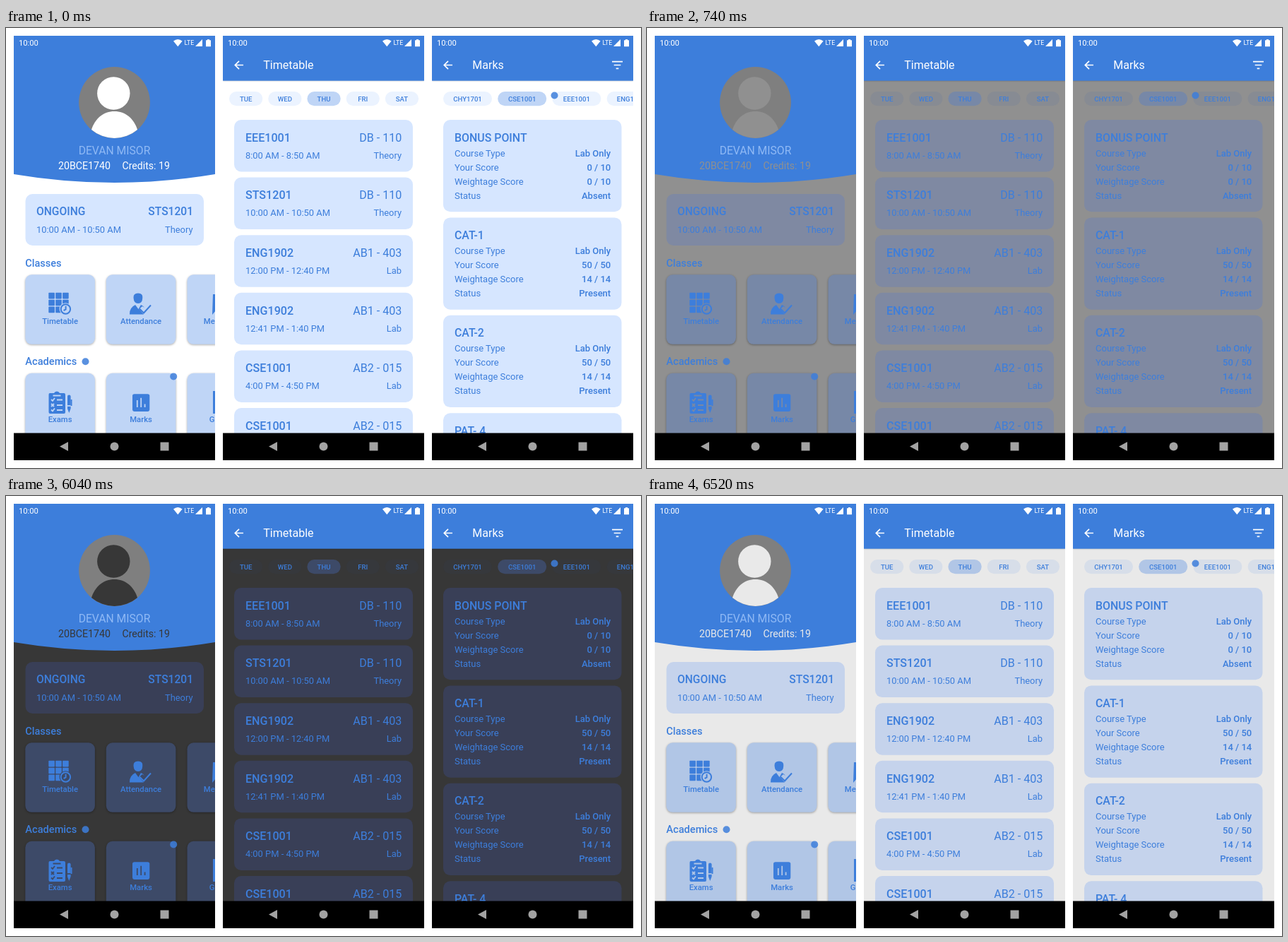
An HTML page that plays this animation: 899x623 px, repeating every 6580 ms.

```html
<!DOCTYPE html>
<html lang="en">
<head>
<meta charset="utf-8">
<title>Student app theme switch</title>
<style>
  html, body { margin: 0; width: 100%; height: 100%; overflow: hidden; background: #fff; }
  #stage { display: block; width: 899px; height: 623px; }
  text { font-family: Roboto, Inter, sans-serif; fill: var(--blue); }
  .m { font-weight: 500; }
  .white { fill: #fff; }
  .name { fill: #8fb9f5; }
  .bg { fill: var(--bg); }
  .card { fill: var(--card); }
  .tile { fill: var(--tile); }
  .pill { fill: var(--pill); }
  .blue { fill: var(--blue); }
  .dot { fill: var(--blue); opacity: .85; }
  .line { fill: none; stroke: #fff; stroke-width: 1.7; }
  .ink { fill: none; stroke: var(--blue); stroke-width: 2; }
  .cut { fill: none; stroke: var(--tile); stroke-width: 1.8; }
  .raised { filter: drop-shadow(0 1.5px 1.5px #0005); }
  .bar { filter: drop-shadow(0 .5px 1px #0004); }
  :root { --blue: #3d7edb; }
</style>
</head>
<body>
<svg id="stage" viewBox="0 0 899 623"></svg>
<script>
const LOOP = 6580, STEP = 60, TO_DARK = 500, TO_LIGHT = 6040;

// light and dark value of each themed colour
const theme = {
  bg: [[255, 255, 255], [33, 33, 33]],
  card: [[214, 230, 255], [40, 44, 68]],
  tile: [[191, 213, 246], [46, 59, 88]],
  pill: [[235, 243, 255], [34, 35, 38]],
};

const rect = (x, y, w, h, cls, r = 0) =>
  `<rect x="${x}" y="${y}" width="${w}" height="${h}" rx="${r}" class="${cls}"/>`;
const circle = (x, y, r, cls) => `<circle cx="${x}" cy="${y}" r="${r}" class="${cls}"/>`;
const path = (d, cls) => `<path d="${d}" class="${cls}"/>`;
// y is the middle of the capitals
const text = (x, y, str, size, cls = '', anchor = 'start') =>
  `<text x="${x}" y="${y + size * .355}" font-size="${size}" class="${cls}" text-anchor="${anchor}">${str}</text>`;
const pair = (x1, x2, y, left, right, size, cls1 = '', cls2 = '') =>
  text(x1, y, left, size, cls1) + text(x2, y, right, size, cls2, 'end');

const statusBar = text(18, 21.5, '10:00', 11.2, 'white')
  + path('M237 18.6Q243.3 13.6 249.6 18.6L243.3 26.2Z', 'white')
  + text(252.5, 21.3, 'LTE', 8.8, 'white')
  + path('M278 16V26H268Z', 'white')
  + path('M283 17.3H285V16H288V17.3H290V26.3H283Z', 'white');

const navBar = rect(11, 573.5, 285, 39, '')
  + `<g fill="#a3a3a3"><path d="M76 592.5L88 586V599Z"/><circle cx="153.5" cy="592.5" r="6"/>
     <path d="M218.5 586.5h12v12h-12z"/></g>`;

function phone(i, body) {
  const x = 11 + 296 * i;
  return `<svg x="${x}" y="11" width="285" height="601" viewBox="${x} 11 285 601">
    ${rect(x, 11, 285, 601, 'bg')}${body}
    <g transform="translate(${296 * i})">${statusBar}${navBar}</g></svg>`;
}

function appBar(x, title) {
  return rect(x, 11, 285, 63.7, 'blue bar')
    + path(`M${x + 29} 52.5h-11.5m5.5-5.7l-5.7 5.7l5.7 5.7`, 'line')
    + text(x + 57.3, 52.2, title, 16, 'white');
}

function pills(x, width, gap, labels, active) {
  return labels.map((label, i) => {
    const left = x + i * gap;
    return rect(left, 90, width, 20.2, i === active ? 'tile' : 'pill', 10.1)
      + text(left + width / 2, 100.2, label, 9.6, 'm', 'middle');
  }).join('');
}

const tile = (x, y, label, icon) => rect(x, y, 98.6, 98.5, 'tile raised', 9) + icon
  + text(x + 49.3, y + 65.2, label, 11.3, 'm', 'middle');

// icons
let timetable = '';
for (let i = 0; i < 9; i++)
  timetable += rect(60.3 + i % 3 * 9.9, 374.8 + Math.floor(i / 3) * 9.9, 8.6, 8.6, 'blue', .8);
timetable += circle(84.4, 398, 8.8, 'tile') + circle(84.4, 398, 6.7, 'ink')
  + path('M84.6 393.8v4.6l-3 1.6', 'ink');

const attendance = path('M180.5 382Q180 375.5 187 375.5T193.3 382Q193 390 187 390T180.5 382Z', 'blue')
  + path('M175 405.5Q174.500 396 183 392L187.500 398L191 392Q194 393 196 396L193 394L188.500 398L195 405.5Z', 'blue')
  + path('M189 397.5L195 403.5L205 392.5', 'ink');

const exams = path('M62 517h6q1-2.500 4-2.500t4 2.500h6q2 0 2 2v25q0 2-2 2H62.500q-2 0-2-2V519q0-2 1.500-2Z', 'blue')
  + path('M66.500 520.500h11M64 526l2 2l3-4M72 526.500h8M64 532l4 4m0-4l-4 4M72 534h8M64 540.500l2 2l3-4M72 541h8', 'cut')
  + path('M87 521.500q0-2 2.300-2t2.300 2V539l-2.300 6L87 539Z', 'blue') + path('M86 535h6', 'cut')
  + path('M92.500 526v9', 'ink');

const marks = rect(179, 518.300, 24.300, 24.600, 'blue', 2.800)
  + path('M185.800 527v10M191.200 523.800v13.200M196.600 532.500v4.500', 'cut');

const home = path('M11 11H296V207Q153.500 231 11 207Z', 'blue')
  + `<circle cx="153.500" cy="105.500" r="50.400" fill="#7f7f7f"/>`
  + circle(152.300, 92.500, 23.200, 'bg')
  + path('M121 144C126 128 138 118 153.500 118S181 128 186 144A50.400 50.400 0 0 1 121 144Z', 'bg')
  + text(153.500, 173.800, 'DEVAN MISOR', 15.700, 'name', 'middle')
  + text(74, 194.600, '20BCE1740', 14.200, 'bg') + text(164.500, 194.600, 'Credits: 19', 14.100, 'bg')
  + rect(27.500, 235, 252.500, 73, 'card', 10)
  + pair(43, 265, 259.700, 'ONGOING', 'STS1201', 15.600, 'm', 'm')
  + pair(43, 264.500, 285, '10:00 AM - 10:50 AM', 'Theory', 12.900)
  + text(27.300, 332.700, 'Classes', 14.500, 'm')
  + tile(27.300, 349.300, 'Timetable', timetable)
  + tile(141.800, 349.300, 'Attendance', attendance)
  + tile(256.500, 349.300, 'Messages', path('M293 377H320V400H297L292 406Z', 'blue'))
  + text(27.300, 472.300, 'Academics', 14.600, 'm') + circle(112.500, 472.200, 5, 'dot')
  + tile(27.300, 488.800, 'Exams', exams)
  + tile(141.800, 488.800, 'Marks', marks) + circle(237.200, 493.400, 5, 'dot')
  + tile(256.500, 488.800, 'Grades', rect(293, 514, 26, 32, 'blue'));

const lessons = [
  ['EEE1001', 'DB - 110', '8:00 AM - 8:50 AM', 'Theory'],
  ['STS1201', 'DB - 110', '10:00 AM - 10:50 AM', 'Theory'],
  ['ENG1902', 'AB1 - 403', '12:00 PM - 12:40 PM', 'Lab'],
  ['ENG1902', 'AB1 - 403', '12:41 PM - 1:40 PM', 'Lab'],
  ['CSE1001', 'AB2 - 015', '4:00 PM - 4:50 PM', 'Lab'],
  ['CSE1001', 'AB2 - 015', '4:51 PM - 5:40 PM', 'Lab'],
];
const week = appBar(307, 'Timetable')
  + pills(316, 47.300, 55.200, ['TUE', 'WED', 'THU', 'FRI', 'SAT'], 2)
  + lessons.map(([code, room, time, kind], i) => {
    const y = 130 + 81.600 * i;
    return rect(323, y, 253, 73.500, 'card', 10)
      + pair(339, 560.300, y + 25, code, room, 16.100, 'm')
      + pair(339, 560, y + 50.300, time, kind, 12.900);
  }).join('');

const tests = [
  ['BONUS POINT', '0 / 10', '0 / 10', 'Absent'],
  ['CAT-1', '50 / 50', '14 / 14', 'Present'],
  ['CAT-2', '50 / 50', '14 / 14', 'Present'],
  ['PAT- 4', '50 / 50', '14 / 14', 'Present'],
];
const scores = appBar(603, 'Marks')
  + path('M858 47.700h15M860.700 52.500h9.600M863.700 57.300h3.600', 'line')
  + pills(619, 69, 77.200, ['CHY1701', 'CSE1001', 'EEE1001', 'ENG1902'], 1)
  + circle(776.500, 95.500, 5, 'dot')
  + tests.map(([title, score, weighted, status], i) => {
    const y = 130 + 138.400 * i;
    const rows = [['Course Type', 'Lab Only'], ['Your Score', score],
      ['Weightage Score', weighted], ['Status', status]];
    return rect(619, y, 252.500, 130.300, 'card', 10)
      + text(635, y + 25, title, 15.900, 'm')
      + rows.map(([a, b], n) => pair(635, 856.200, y + 47 + 20 * n, a, b, 13, '', 'm')).join('');
  }).join('');

document.getElementById('stage').innerHTML = [home, week, scores].map((body, i) => phone(i, body)).join('');

// 0 is light, 1 is dark; the theme fades in steps of a tenth
function darkness(t) {
  if (t < TO_DARK) return 0;
  if (t < TO_LIGHT) return Math.min(10, Math.floor((t - TO_DARK) / STEP) + 1) / 10;
  return Math.max(0, 9 - Math.floor((t - TO_LIGHT) / STEP)) / 10;
}

function draw(now) {
  const k = darkness(now % LOOP);
  for (const [key, [light, dark]] of Object.entries(theme)) {
    const rgb = light.map((v, i) => Math.round(v + (dark[i] - v) * k));
    document.documentElement.style.setProperty('--' + key, `rgb(${rgb})`);
  }
}

function frame() {
  draw(performance.now());
  requestAnimationFrame(frame);
}
frame();
</script>
</body>
</html>
```
